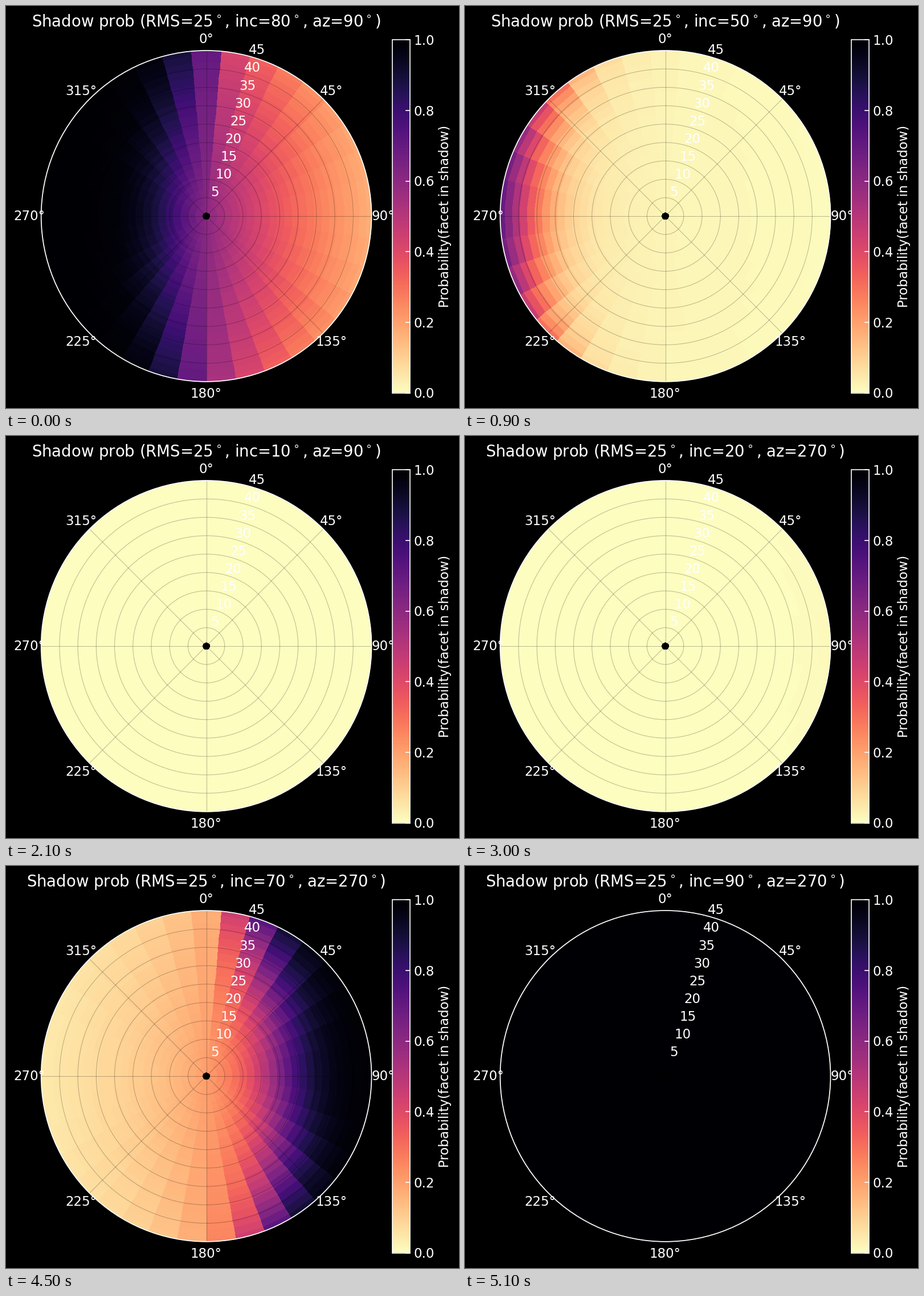
These frames come from a looping animation (795x704 px, 5.4 s). A matplotlib script:

```python
import numpy as np
import matplotlib.pyplot as plt
from matplotlib.animation import FuncAnimation
from matplotlib.patches import Circle, Rectangle

W, H = 795, 704
CX, CY, RADIUS, MAX_SLOPE = 351.6, 367.9, 289.9, 45
LABEL_RADIUS = 310.3
BAR_LEFT, BAR_RIGHT, BAR_TOP, BAR_BOTTOM = 678.2, 709.2, 59.2, 677.5
TEXT_SIZE, TITLE_SIZE = 16.5, 19.8
CAP_HALF = 8.4

# The sun rises in the east, passes overhead and sets in the west.
SUN = [(abs(i), 90 if i < 0 else 270) for i in range(-80, 91, 10)]

AZ_STEP, SLOPE_STEP = 360 / 35, 90 / 44
az_index = np.arange(36)
slope_index = np.arange(1, 23)


def polar(r, azimuth):
    """Pixel position, with azimuth clockwise from the top."""
    a = np.radians(azimuth)
    return CX + r * np.sin(a), CY - r * np.cos(a)


def slope_radius(slope):
    return RADIUS * slope / MAX_SLOPE


def logistic(x):
    return 1 / (1 + np.exp(-x))


def shadow_prob(inc, sun_az):
    slope = np.radians(slope_index * SLOPE_STEP)[:, None]
    away = -np.cos(np.radians(5 + 10 * az_index - sun_az))[None, :]
    tilt = np.degrees(np.arctan(np.tan(slope) * away))
    elevation = 90 - inc
    if elevation == 0:
        return np.ones_like(tilt)
    # A facet is dark if it faces away from the sun or lies in a cast shadow.
    turned_away = logistic((tilt - elevation - 1) / 5.5)
    cast = logistic(4.3 - 1.29 * np.sqrt(elevation) + 0.0005 * inc * tilt)
    return 1 - (1 - turned_away) * (1 - cast)


plt.rcParams["font.family"] = "DejaVu Sans"
fig = plt.figure(figsize=(W / 100, H / 100), dpi=100, facecolor="black")
ax = fig.add_axes([0, 0, 1, 1])
ax.axis("off")


def label(x, y, text, size=TEXT_SIZE, **kw):
    kw = {"ha": "center", "va": "baseline", "zorder": 5, **kw}
    return ax.text(x, y, text, color="white", fontsize=size, **kw)


# Facet mesh, clipped to the disc
rim = Circle((CX, CY), RADIUS, fill=False, ec="white", lw=1.25, zorder=4)
ax.add_patch(rim)
slope_edges = (np.arange(23) + 0.5) * SLOPE_STEP
az_edges = (np.arange(37) - 0.5) * AZ_STEP
mesh = ax.pcolormesh(*polar(slope_radius(slope_edges)[:, None], az_edges[None, :]),
                     shadow_prob(*SUN[0]), cmap="magma_r", vmin=0, vmax=1, zorder=1)
mesh.set_clip_path(rim)

# Grid and its labels
grid = dict(color="black", alpha=0.27, lw=0.7, zorder=3)
for slope in range(5, 50, 5):
    if slope < MAX_SLOPE:
        ax.add_patch(Circle((CX, CY), slope_radius(slope), fill=False, **grid))
    x, y = polar(slope_radius(slope), 15)
    label(x - 0.4, y - 3.5, str(slope), ha="left")
for azimuth in range(0, 360, 45):
    x, y = polar(RADIUS, azimuth)
    ax.plot([CX, x], [CY, y], **grid)
    x, y = polar(LABEL_RADIUS, azimuth)
    label(x - 0.3, y - 1 + CAP_HALF, f"{azimuth}°")

# Colour bar
ax.imshow(np.linspace(1, 0, 256)[:, None], cmap="magma_r", vmin=0, vmax=1, aspect="auto",
          extent=(BAR_LEFT, BAR_RIGHT, BAR_BOTTOM, BAR_TOP), zorder=6)
ax.add_patch(Rectangle((BAR_LEFT, BAR_TOP), BAR_RIGHT - BAR_LEFT, BAR_BOTTOM - BAR_TOP,
                       fill=False, ec="white", lw=1.2, zorder=7))
for value in np.linspace(0, 1, 6):
    y = BAR_BOTTOM + (BAR_TOP - BAR_BOTTOM) * value
    ax.plot([BAR_RIGHT - 7, BAR_RIGHT], [y, y], color="white", lw=1.2, zorder=7)
    label(715.5, y + CAP_HALF + 0.5, f"{value:.1f}", ha="left")
label(777, 368.5, "Probability(facet in shadow)", rotation=90, rotation_mode="anchor")

title = label(CX - 0.6, 36, "", TITLE_SIZE)
ax.set_xlim(0, W)
ax.set_ylim(H, 0)


def update(i):
    inc, sun_az = SUN[i]
    mesh.set_array(shadow_prob(inc, sun_az))
    title.set_text(rf"Shadow prob (RMS=25$^\circ$, inc={inc}$^\circ$, az={sun_az}$^\circ$)")
    return mesh, title


anim = FuncAnimation(fig, update, frames=len(SUN), interval=300, repeat=True, repeat_delay=0)
plt.show()
```
